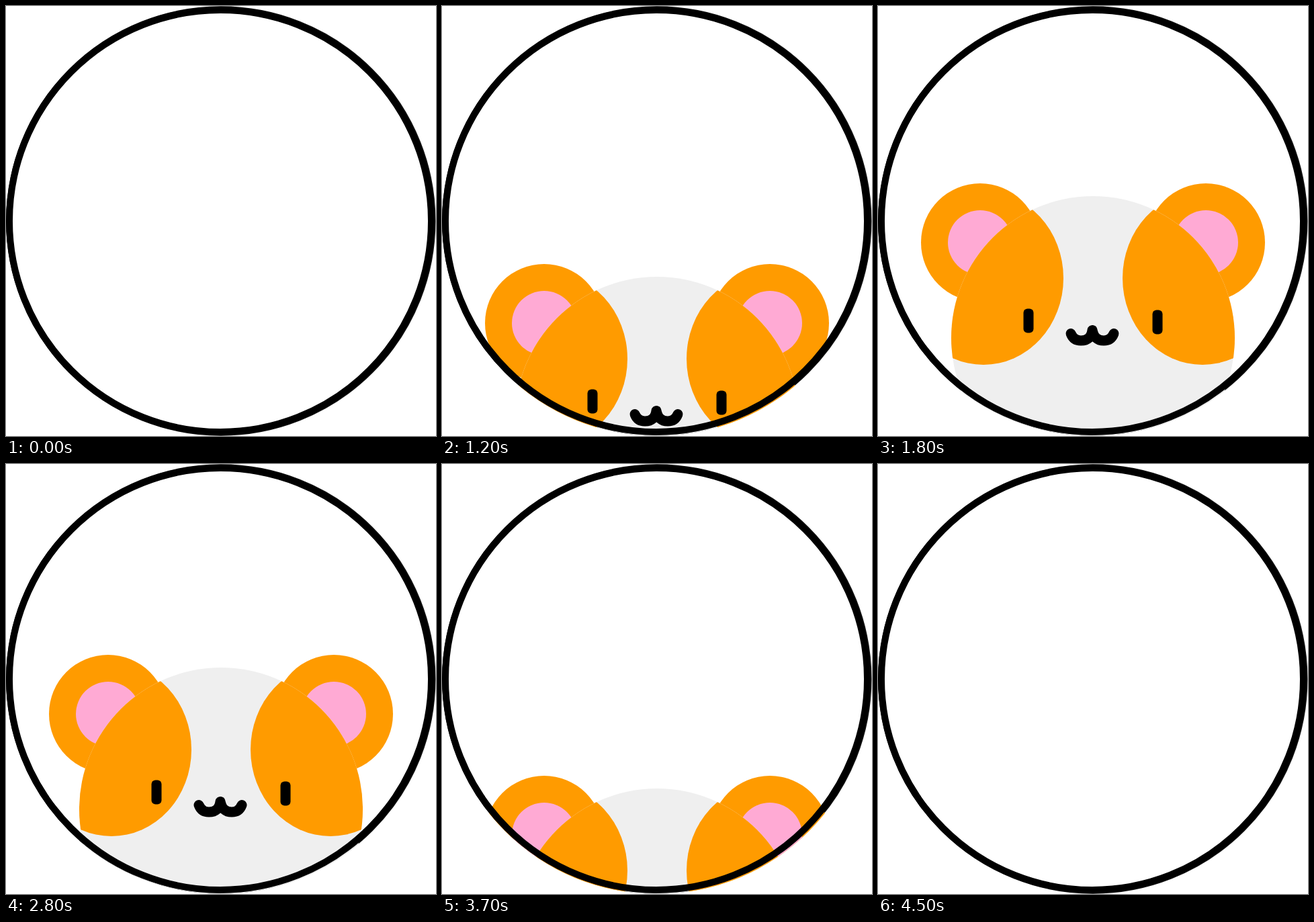
Write an HTML page that moves like this. It is 640 by 640 pixels and loops after 4.6 s.

```html
<!DOCTYPE html>
<html lang="en">
<head>
<meta charset="utf-8">
<title>Hamster peek</title>
<style>
  html, body { margin: 0; width: 100%; height: 100%; overflow: hidden; background: #fff; }
  svg { display: block; width: 100%; height: 100%; }
</style>
</head>
<body>
<svg viewBox="0 0 640 640">
  <defs>
    <clipPath id="porthole"><circle cx="320" cy="320" r="320"/></clipPath>
    <clipPath id="head"><circle cx="320" cy="494" r="211"/></clipPath>
    <g id="ear">
      <circle cx="152" cy="352" r="88" fill="#ff9b00"/>
      <circle cx="152" cy="352" r="48" fill="#ffaad4"/>
    </g>
    <ellipse id="patch" cx="157" cy="405" rx="119" ry="129" fill="#ff9b00"/>
  </defs>

  <circle cx="319.8" cy="320" r="317.7" fill="none" stroke="#111" stroke-width="4"/>

  <g clip-path="url(#porthole)">
    <g id="hamster">
      <use href="#ear"/>
      <use href="#ear" transform="matrix(-1 0 0 1 640 0)"/>
      <circle cx="320" cy="494" r="211" fill="#efefef"/>
      <g clip-path="url(#head)">
        <use href="#patch"/>
        <use href="#patch" transform="matrix(-1 0 0 1 640 0)"/>
      </g>
      <rect x="216.5" y="450.5" width="15" height="36" rx="6"/>
      <rect x="408.5" y="452.5" width="15" height="36" rx="6"/>
      <path d="M287 487.5Q291 498 302 498Q317 498 319 482.5Q322 498 336 498Q347 498 351 487.5"
            fill="none" stroke="#000" stroke-width="15" stroke-linecap="round" stroke-linejoin="round"/>
    </g>
  </g>

  <circle cx="319" cy="320" r="314" fill="none" stroke="#000" stroke-width="10"/>
</svg>
<script>
  const LOOP = 4600, TICK = 100, STEP = 20;
  const RISE = 18, FALL = 27;
  const hamster = document.getElementById('hamster');

  // Steps below the top pose: rise, hold, sink.
  function depth(tick) {
    return Math.max(RISE - tick, 0, tick - FALL);
  }

  function draw(ms) {
    const tick = Math.floor((ms % LOOP) / TICK);
    hamster.setAttribute('transform', `translate(0 ${depth(tick) * STEP})`);
  }

  const start = performance.now();
  function loop() {
    draw(performance.now() - start);
    requestAnimationFrame(loop);
  }
  loop();
</script>
</body>
</html>
```
